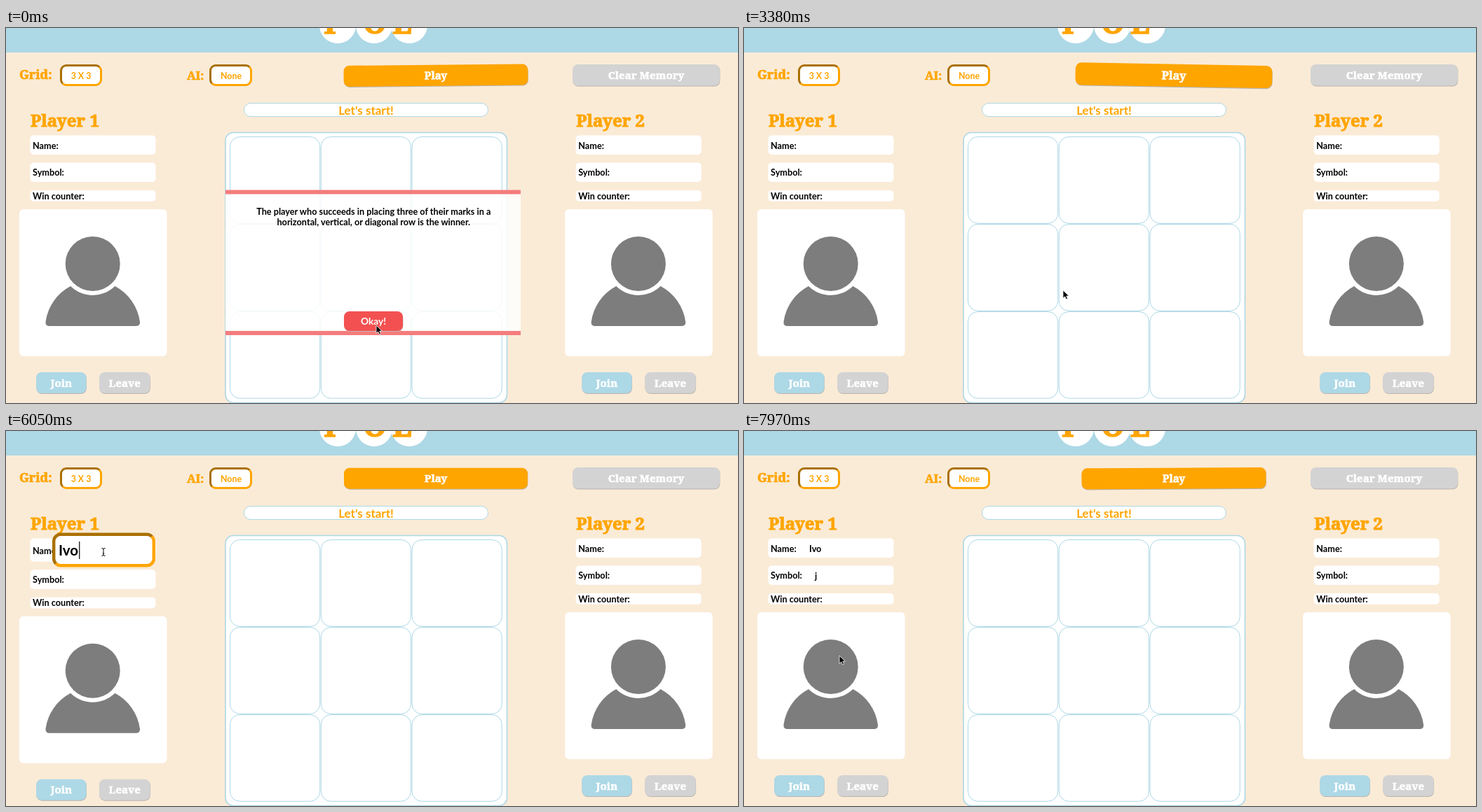
These frames come from a looping animation (1044 px wide and 536 px high, 8000 ms). An HTML page:

```html
<!DOCTYPE html>
<html lang="en">
<head>
<meta charset="utf-8">
<title>Tic tac toe</title>
<style>
  html, body { margin: 0; width: 100%; height: 100%; overflow: hidden; background: #faebd7; }
  svg { display: block; width: 1044px; height: 536px; }
  text { white-space: pre; }
  .hand { font-family: Lato, "Open Sans", sans-serif; font-weight: 700; }
  .deco { font-family: "Noto Serif", "DejaVu Serif", serif; font-weight: 900; stroke-width: .04em; }
</style>
</head>
<body>
<svg id="stage" viewBox="0 0 1044 536"></svg>
<script>
const LOOP = 8000, STEP = 147.8, STEP_BASE = 2188;
const ORANGE = '#ffa500', DARK_ORANGE = '#aa7000', BLUE = '#add8e6', GRAY = '#d3d3d3';
const RED = '#f35151', DARK_RED = '#a23336';
const PLAYER_NAME = 'Ivo', PLAYER_SYMBOL = 'j';

const stage = document.getElementById('stage');
const pen = document.createElement('canvas').getContext('2d');

const clamp = v => Math.max(0, Math.min(1, v));
const ramp = (t, from, to) => clamp((t - from) / (to - from));
const mix = (a, b, p) => a + (b - a) * p;
const mixAll = (a, b, p) => a.map((v, i) => mix(v, b[i], p));

const rect = (x, y, w, h, r, fill, extra = '') =>
  `<rect x="${x}" y="${y}" width="${w}" height="${h}" rx="${r}" fill="${fill}" ${extra}/>`;
const group = (attrs, body) => `<g ${attrs}>${body}</g>`;
const label = (str, x, y, size, fill, anchor, cls, extra) =>
  `<text class="${cls}" x="${x}" y="${y}" font-size="${size}" fill="${fill}" text-anchor="${anchor}" ${extra}>${str}</text>`;
const hand = (str, x, y, size, fill = '#000', anchor = 'start') =>
  label(str, x, y, size, fill, anchor, 'hand', '');
const deco = (str, x, y, size, fill = ORANGE, anchor = 'start') =>
  label(str, x, y, size, fill, anchor, 'deco', `stroke="${fill}"`);

// White box with an inset border: dark on the top and left, light on the others.
function insetBox(x, y, w, h, r, line, dark, light, fill = '#fff') {
  const i = line / 2, R = r - i, c = R * 0.293;
  const l = x + i, t = y + i, e = x + w - i, b = y + h - i;
  const arc = (px, py) => `A${R} ${R} 0 0 1 ${px} ${py}`;
  const edge = (d, color) => `<path d="${d}" fill="none" stroke="${color}" stroke-width="${line}"/>`;
  return rect(l, t, w - line, h - line, R, fill) +
    edge(`M${e - c} ${t + c}${arc(e, t + R)}V${b - R}${arc(e - R, b)}H${l + R}${arc(l + c, b - c)}`, light) +
    edge(`M${l + c} ${b - c}${arc(l, b - R)}V${t + R}${arc(l + R, t)}H${e - R}${arc(e - c, t + c)}`, dark);
}

function button(str, x, y, w, h, fill) {
  return rect(x + .4, y + 1, w, h, 8, '#b9b4ad') + rect(x, y, w, h, 8, fill) +
    deco(str, x + w / 2, y + h / 2 + 5.5, 15.1, '#fff', 'middle');
}

function header() {
  const letter = (ch, x, center) => `<circle cx="${center}" cy="-4" r="26" fill="#fff"/>` +
    deco(ch, x, 8, 42, ORANGE, 'middle');
  return rect(0, 0, 1044, 35, 0, BLUE) + letter('T', 462, 473) + letter('O', 526, 525) + letter('E', 565, 575) +
    deco('Grid:', 19, 73, 18) + insetBox(77, 52, 60, 31, 9, 3, DARK_ORANGE, ORANGE) +
    hand('3 X 3', 107, 73, 12.4, ORANGE, 'middle') +
    deco('AI:', 258, 74, 16.6) + insetBox(290, 52, 61, 31, 9, 3, DARK_ORANGE, ORANGE) +
    hand('None', 321, 73, 12.4, ORANGE, 'middle') +
    button('Clear Memory', 808, 52, 210, 30.5, GRAY);
}

function board() {
  const outline = width => `stroke="${BLUE}" stroke-width="${width}"`;
  let out = rect(339.5, 107.5, 348, 19, 9.5, '#fff', outline(1)) +
    hand("Let's start!", 513.5, 123.5, 17, ORANGE, 'middle') +
    rect(313, 149.5, 401.5, 386, 11, '#fff', outline(1.6));
  for (let i = 0; i < 9; i++)
    out += rect(319.5 + i % 3 * 129.8, 155.5 + Math.floor(i / 3) * 125, 128.2, 123.8, 14, '#fff', outline(1));
  return out;
}

function avatar(dy) {
  return group(`transform="translate(0 ${dy})"`, rect(19, 259, 210.5, 210, 6, '#fff') +
    `<path d="M56.5 420A67.8 67.8 0 0 1 92 369H155.4A67.8 67.8 0 0 1 191 420Q191.500 426 185 426H62Q56 426 56.5 420Z" fill="#7d7d7d"/>
     <circle cx="123.7" cy="337" r="45" fill="#fff"/><circle cx="123.7" cy="337" r="39" fill="#7d7d7d"/>`);
}

// Text field that grows from a plain label into a framed input.
function field(rest, open, p, value, caret) {
  const [x, y, w, h, tx, ty, size] = mixAll(rest, open, p);
  let out = p ? insetBox(x, y, w, h, 6 + 6 * p, 4.4 * p, DARK_ORANGE, ORANGE) : '';
  if (value) out += hand(value, tx, ty, size);
  if (caret) {
    pen.font = `700 ${size}px Lato, "Open Sans", sans-serif`;
    const cx = value ? tx + pen.measureText(value).width + 1 : tx - 1;
    out += rect(cx, ty - 20, 1.2, 25, 0, '#000');
  }
  return out;
}

function player(number, x, state) {
  const { name, symbol, nameOpen: n, symbolOpen: s, nameCaret, symbolCaret } = state;
  const grow = 2.5 * s, a = 5.7 * n, b = 5.7 * clamp(n + s), left = 34.5 - grow, wide = 179 + 2 * grow;
  return group(`transform="translate(${x} 0)"`,
    deco('Player ' + number, 35 - grow, 141, 24.1) +
    rect(left, 153.5, wide, 27.5 + a, 5, '#fff') + hand('Name:', left + 3.5, 173 + a / 2, 12.7) +
    rect(left, 192.5 + a, wide, 27.5 + b - a, 5, '#fff') + hand('Symbol:', left + 3.5, 211 + (a + b) / 2, 12.7) +
    rect(left, 232 + b, wide, 15.8, 5, '#fff') + hand('Win counter:', left + 3.5, 244.5 + b, 12.7) +
    avatar(b) +
    button('Join', 43 - grow, 492 + b, 71.5 + grow, 30, BLUE) +
    button('Leave', 133 + grow / 3, 492 + b, 72.5 + grow / 2, 30, GRAY) +
    field([82, 156, 120, 22, 93 - grow, 173, 12.7], [66, 145.5, 147, 49, 75, 178, 20.5], n, name, nameCaret) +
    field([90, 195 + a, 112, 22, 101, 212 + a, 12.7], [70.5, 184, 150.5, 50, 80, 216, 20.5], s, symbol, symbolCaret));
}

function playButton(t) {
  const start = t < 2000 ? 6255 - LOOP : t < 6000 ? 2179 : 6255;
  const u = t - start, span = 1900;
  let angle = 0, scale = 1;
  if (u > 0 && u < span) {
    const force = Math.min(1, 1.9 * (1 - u / span)) ** 1.5;
    angle = 15 * force * Math.sin(2 * Math.PI * u / 480);
    scale = 1 + 0.13 * force * Math.sin(Math.PI * u / span);
  }
  return group(`transform="translate(613 67.7) rotate(${angle}) scale(${scale})"`,
    button('Play', -131, -15, 262, 30, ORANGE));
}

function popup(t) {
  const opacity = 1 - ramp(t, 2140, 3040), p = ramp(t, 1005, 1301);
  if (!opacity) return '';
  const [x, y, w, h, size] = mixAll([482, 405, 84, 28, 13.7], [460.5, 392, 125.5, 49, 20.5], p);
  const blend = (a, b) => `rgb(${mixAll(a, b, p).map(Math.round)})`;
  const red = [243, 81, 81], white = [255, 255, 255];
  const okay = p
    ? insetBox(x, y, w, h, 8 + 3 * p, 4.4 * p, DARK_RED, RED, blend(red, white))
    : rect(x + .5, y + 1, w, h, 8, '#c9b5b5') + rect(x, y, w, h, 8, RED);
  return group(`opacity="${opacity}"`,
    rect(313, 237, 421, 197, 0, '#fff', 'fill-opacity=".86"') +
    rect(313, 231.5, 421, 6, 0, '#f47c7c') + rect(313, 433, 421, 6, 0, '#f47c7c') +
    hand('The player who succeeds in placing three of their marks in a', 524.3, 267, 12.7, '#000', 'middle') +
    hand('horizontal, vertical, or diagonal row is the winner.', 524.3, 282, 12.7, '#000', 'middle') +
    okay + hand('Okay!', x + w / 2, y + h / 2 + size * .35, size, blend(white, red), 'middle'));
}

const POINTERS = {
  arrow: '<path d="M0 0V11.5L2.7 9 4.5 13 6.5 12 4.8 8.2H8.4Z" fill="#000" stroke="#fff" stroke-width=".8"/>',
  hand: `<path d="M-.8 1Q0-.6 1 1V5Q3 4 4 5.3 5.600 4.800 6 6.200V9.5L5 13H0L-3.2 8Q-3.2 6.3-.8 8Z"
    fill="#fff" stroke="#000" stroke-width="1"/>`,
  text: '<path d="M-2.5-5.5Q0-5.5 0-4 0-5.5 2.5-5.5M0-4V4M-2.5 5.5Q0 5.5 0 4 0 5.5 2.5 5.5M-1.2 2H1.2" fill="none" stroke="#000"/>'
};
const ROUTE = [
  [0, 528, 425], [1000, 528, 425], [1153, 527, 426], [1600, 527, 426], [1745, 525, 428],
  [1893, 525, 427], [2100, 524, 427], [2779, 513, 418], [3230, 513, 418], [4109, 150, 148],
  [4405, 139, 173], [6200, 139, 173], [6622, 140, 210], [7361, 140, 210], [7952, 136, 321], [LOOP, 136, 321]
];

function pointer(t) {
  const i = Math.max(1, ROUTE.findIndex(stop => stop[0] >= t));
  const [from, to] = [ROUTE[i - 1], ROUTE[i]];
  const [, x, y] = mixAll(from, to, ramp(t, from[0], to[0]));
  const kind = t < 1150 ? 'arrow' : t < 3000 ? 'hand' : t < 4400 ? 'arrow' : t < 7600 ? 'text' : 'arrow';
  return group(`transform="translate(${x} ${y})"`, POINTERS[kind]);
}

function draw(t) {
  const typed = [5700, 5850, 6000].filter(at => t >= at).length;
  const first = {
    name: PLAYER_NAME.slice(0, typed),
    symbol: t >= 7000 ? PLAYER_SYMBOL : '',
    nameOpen: ramp(t, 4300, 4700) - ramp(t, 6200, 6620),
    symbolOpen: ramp(t, 6400, 6765) - ramp(t, 7380, 7800),
    nameCaret: t > 4650 && t < 6300 && !(t > 5250 && t < 5700),
    symbolCaret: t > 6600 && t < 7400
  };
  const second = { name: '', symbol: '', nameOpen: 0, symbolOpen: 0 };
  stage.innerHTML = rect(0, 0, 1044, 536, 0, '#faebd7') + header() + board() +
    player(1, 0, first) + player(2, 778.2, second) + playButton(t) + popup(t) + pointer(t);
}

let shown;
function tick() {
  const t = performance.now() % LOOP;
  const step = Math.floor((t - STEP_BASE) / STEP);
  if (step !== shown) {
    shown = step;
    draw(STEP_BASE + step * STEP);
  }
  requestAnimationFrame(tick);
}
tick();
</script>
</body>
</html>
```
